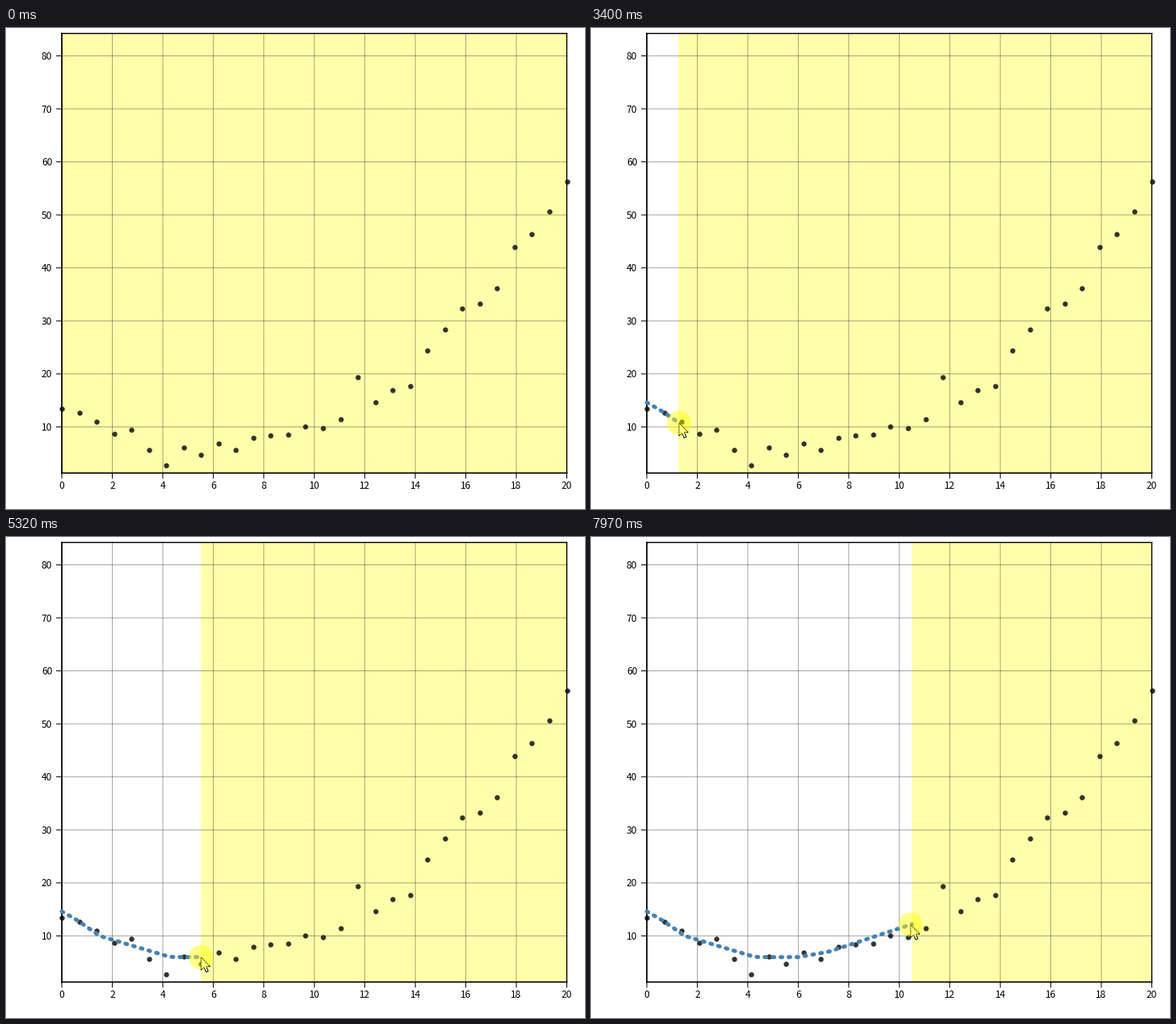
Recreate the animation shown at these times as a matplotlib script. Size 716x595 px, loop 8 s.

```python
import numpy as np
import matplotlib.pyplot as plt
from matplotlib.animation import FuncAnimation
from matplotlib.patches import Circle, Polygon, Rectangle

W, H, DPI = 716, 595, 100
PT = 72 / DPI
STEP, LOOP = 40, 8000
LEFT, RIGHT, TOP, BOTTOM = 69, 693.5, 6.7, 550.5

TICK = 77.4                      # the pointer moves once per tick
ENTER, ARRIVE, NUDGE = 280, 1300, 1910
DRAG, RELEASE = 2540, 6910
PRESSES = [(1580, RELEASE), (7560, LOOP)]

READINGS = [13.4, 12.7, 11, 8.7, 9.4, 5.6, 2.7, 6.1, 4.8, 6.9,
            5.7, 7.9, 8.4, 8.5, 10, 9.7, 11.4, 19.4, 14.6, 17,
            17.7, 24.4, 28.3, 32.4, 33.2, 36.2, 43.9, 46.3, 50.6, 56.3]

# key points of the hand-drawn guess, in data units
GUESS_X = [0, 0.6, 1.5, 4.3, 6, 7.2, 8.4, 10.5]
GUESS_Y = [14.6, 13, 10, 6, 6, 7, 8.9, 12.2]

# pointer position on the x axis while drawing
DRAG_T = [DRAG, 3320, 4090, 5320, 6090, 6720, 6950, 7650, 7970]
DRAG_X = [0.06, 1.12, 2.8, 5.49, 8.17, 9.77, 10.1, 10.1, 10.46]

ARROW = np.array([(0, 0), (0, 16), (3.7, 12.6), (6.3, 18.5), (9, 17.4),
                  (6.4, 11.6), (11.3, 11.6)])


def px(v):
    return LEFT + (RIGHT - LEFT) / 20 * v


def py(v):
    return 559 - 6.557 * v


def guess(x):
    return np.interp(x, GUESS_X, GUESS_Y)


fig = plt.figure(figsize=(W / DPI, H / DPI), dpi=DPI, facecolor="white")
ax = fig.add_axes([0, 0, 1, 1])
ax.set_xlim(0, W)
ax.set_ylim(H, 0)
ax.axis("off")


def line(x0, y0, x1, y1, width=1, alpha=1):
    ax.plot([x0, x1], [y0, y1], color="black", lw=width * PT, alpha=alpha,
            zorder=2, solid_capstyle="projecting", snap=False)


def label(x, y, v, ha):
    ax.text(x, y, str(v), size=12 * PT, family="Noto Sans CJK JP",
            ha=ha, va="baseline")


for v in range(0, 21, 2):
    line(px(v), TOP, px(v), BOTTOM, alpha=0.35)
    line(px(v), BOTTOM, px(v), 557)
    label(px(v), 570.3, v, "center")

for v in range(10, 81, 10):
    line(LEFT, py(v), RIGHT, py(v), alpha=0.35)
    line(62.5, py(v), LEFT, py(v))
    label(57.3, py(v) + 4.6, v, "right")

for x, width in ((LEFT, 1.7), (RIGHT, 1.4)):
    line(x, TOP, x, BOTTOM, width)
for y, width in ((BOTTOM, 1.7), (TOP, 1.4)):
    line(LEFT, y, RIGHT, y, width)

cover = ax.add_patch(Rectangle((LEFT, TOP), 0, BOTTOM - TOP, lw=0,
                               fc=(1, 1, 0, 0.33), zorder=0))
ax.scatter(px(np.linspace(0, 20, len(READINGS))), py(np.array(READINGS)),
           s=(6.4 * PT) ** 2, color="black", alpha=0.8, linewidths=0,
           zorder=5)
curve, = ax.plot([], [], color="steelblue", lw=5 * PT, zorder=6,
                 dashes=(0.4, 1.58), dash_capstyle="round")
pointer = ax.add_patch(Polygon(ARROW, closed=True, fc="white", ec="black",
                               lw=PT, joinstyle="miter", zorder=7))
halo = ax.add_patch(Circle((0, 0), 15, fc=(1, 1, 0, 0.47), lw=0, zorder=8))


def pointer_at(t):
    if t < NUDGE:
        u = np.clip((t - ENTER) / (ARRIVE - ENTER), 0, 1)
        left = (1 - u) ** 2
        return 73 + 204 * left, 463 + 137 * left
    x = np.interp(t, DRAG_T, DRAG_X)
    return px(x), py(guess(x))


def draw(i):
    now = i * STEP
    t = DRAG + TICK * round((now - DRAG) / TICK)
    x, y = pointer_at(t)
    pointer.set_xy(ARROW + (x, y))
    halo.center = (x, y)
    halo.set_visible(any(a <= now < b for a, b in PRESSES))

    # the guess is stored every quarter unit
    edge = round(np.interp(t, DRAG_T, DRAG_X) * 4) / 4
    cover.set_x(px(edge))
    cover.set_width(RIGHT - px(edge))
    xs = np.arange(0, edge + 0.1, 0.25) if edge else np.array([])
    curve.set_data(px(xs), py(guess(xs)))
    return cover, curve, pointer, halo


def reset():
    return draw(0)


anim = FuncAnimation(fig, draw, frames=LOOP // STEP, init_func=reset,
                     interval=STEP, repeat=True, repeat_delay=0, blit=False)
plt.show()
```
